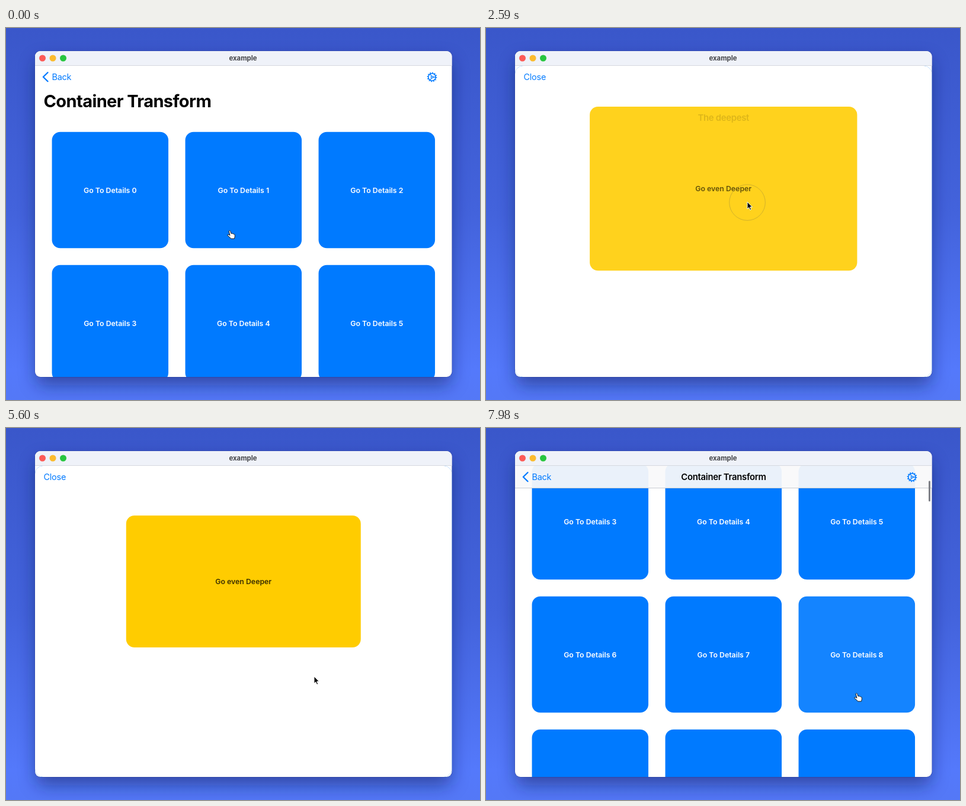
Recreate the animation shown at these times as an HTML page. Size 800x629 px, loop 8 s.

```html
<!DOCTYPE html>
<html lang="en">
<head>
<meta charset="utf-8">
<title>Container Transform</title>
<style>
html, body { margin: 0; width: 100%; height: 100%; overflow: hidden; background: #4362d8; }
svg { display: block; width: 100%; height: 100%; }
text { font-family: Inter, "Open Sans", sans-serif; font-optical-sizing: none; }
.mid { text-anchor: middle; }
.label { font-size: 12.3px; font-weight: 600; fill: #fff; }
.nav { font-size: 14.4px; letter-spacing: -.2px; fill: #007aff; }
.title { font-size: 14.9px; font-weight: 600; letter-spacing: -.3px; }
.large { font-size: 29px; font-weight: 700; letter-spacing: -.6px; }
.bar { font-size: 11.4px; font-weight: 700; fill: #444549; }
</style>
</head>
<body>
<svg id="stage" viewBox="0 0 800 629" preserveAspectRatio="none">
  <defs>
    <linearGradient id="sky" x1="0" y1="0" x2="0" y2="1">
      <stop offset="0" stop-color="#3a57ca"/>
      <stop offset=".5" stop-color="#4363dc"/>
      <stop offset=".92" stop-color="#5479fb"/>
      <stop offset="1" stop-color="#5478f6"/>
    </linearGradient>
    <filter id="soft" x="-20%" y="-20%" width="140%" height="140%"><feGaussianBlur stdDeviation="15"/></filter>
    <clipPath id="win"><rect x="49" y="39" width="703.5" height="551" rx="9"/></clipPath>
    <clipPath id="body"><rect x="49" y="64" width="704" height="526"/></clipPath>
  </defs>
  <rect width="800" height="629" fill="url(#sky)"/>
  <rect x="51" y="54" width="700" height="550" rx="12" fill="#101c58" opacity=".52" filter="url(#soft)"/>
  <rect x="48.5" y="38.5" width="704.5" height="552" rx="9.5" fill="#22317a" opacity=".45"/>
  <g clip-path="url(#win)">
    <rect x="49" y="39" width="704" height="551" fill="#fff"/>
    <g clip-path="url(#body)">
      <g id="list">
        <g id="scroll"><text class="large" x="63.5" y="134">Container Transform</text></g>
        <g id="navbar">
          <rect x="49" y="64" width="704" height="37" fill="#f9f9fa" fill-opacity=".94"/>
          <path d="M49 101.5H753" stroke="#c9ccd2"/>
          <text class="title mid" x="401" y="88">Container Transform</text>
        </g>
        <rect id="thumb" x="747" width="3" height="35" rx="1.5" fill="#808288"/>
        <path d="M70.5 75.2L62.8 82.7L70.5 90.2" fill="none" stroke="#007aff" stroke-width="2.3" stroke-linecap="round" stroke-linejoin="round"/>
        <text class="nav" x="77.5" y="88">Back</text>
        <g transform="translate(719 83)" fill="none" stroke="#007aff">
          <circle r="6.2" stroke-width="1.6"/>
          <circle r="7.6" stroke-width="1.5" stroke-dasharray="1.7 2.28"/>
          <circle r="1.7" stroke-width="1.2"/>
          <path d="M1.7 0H6M-.9 -1.5L-3 -5.2M-.9 1.5L-3 5.2" stroke-width="1.3"/>
        </g>
      </g>
      <g id="heroes"></g>
      <text id="close" class="nav" x="63.5" y="88">Close</text>
      <g id="ripples"></g>
    </g>
    <rect x="49" y="39" width="704" height="25" fill="#eff2f9"/>
    <path d="M49 63.5H753" stroke="#d6d9e0"/>
    <circle cx="61.5" cy="51" r="5.5" fill="#fc5b57"/>
    <circle cx="79" cy="51" r="5.5" fill="#fbbb2e"/>
    <circle cx="96.5" cy="51" r="5.5" fill="#28c63f"/>
    <text class="bar mid" x="400" y="55">example</text>
  </g>
  <path id="arrow" d="M0 0V12L2.8 9.5L4.7 13.8L6.7 12.9L4.8 8.7H8.4Z" fill="#000" stroke="#fff" stroke-width="1"/>
  <path id="hand" d="M-.9 .6C-.6 -.6 1.2 -.8 1.7 .5L3 4.6C4 4 5 4.3 5.4 5C6.3 4.6 7.1 5 7.4 5.7C8.5 5.5 9.1 6.2 9.2 7.2C9.4 9.2 9.3 11 8.2 13.2H2.6C1.3 11.3 -.7 9.6 -2.7 8.1C-3.8 6.9 -2.2 5.7 -.9 6.4L1 7.6Z" fill="#fff" stroke="#111" stroke-width="1"/>
</svg>
<script>
const LOOP = 8000, ROW = 225, SIDE = 196.5, RADIUS = 14;
const BLUE = '#007aff', YELLOW = '#ffcc00';
const PAGE = { x: 400.75, y: 327, w: 703.5, h: 526 };
const TILE = { x: 175.8, y: 274, w: SIDE, h: SIDE };
const DEEP = { x: 400.75, y: 259.5, w: 396, h: 223 };

const $ = id => document.getElementById(id);
const set = (node, attrs) => { for (const k in attrs) node.setAttribute(k, attrs[k]); };
const add = (parent, tag, attrs, text = '') => {
  const node = document.createElementNS('http://www.w3.org/2000/svg', tag);
  set(node, attrs);
  node.textContent = text;
  return parent.appendChild(node);
};
const clamp = v => Math.max(0, Math.min(1, v));
const mix = (a, b, k) => a + (b - a) * k;
const smooth = v => { v = clamp(v); return v * v * (3 - 2 * v); };
// what is left of a critically damped spring after ms
const spring = (rate, ms) => {
  const u = rate * Math.max(0, ms) / 1000;
  return (1 + u) * Math.exp(-u);
};

// pointer: time, x, y
const PATH = [
  [0, 377, 343], [200, 377, 343], [900, 218, 322], [1050, 220, 324], [1400, 222, 325],
  [2250, 441, 294], [2800, 441, 294], [3400, 169, 387], [3750, 169, 387], [4265, 421, 250],
  [4550, 451, 273], [5000, 458, 290], [5500, 520, 420], [5600, 520, 420], [6086, 582, 346],
  [6300, 645, 354], [6900, 640, 400], [7400, 625, 449], [8000, 625, 449]
];
function pointer(t) {
  const i = Math.max(1, PATH.findIndex(p => p[0] >= t));
  const [a, b] = [PATH[i - 1], PATH[i]];
  const k = smooth((t - a[0]) / (b[0] - a[0]));
  return { x: mix(a[1], b[1], k), y: mix(a[2], b[2], k) };
}

const scrollAt = t => 341 * (1 - (1 - clamp((t - 6850) / 950)) ** 3);
const inside = (p, r) => Math.abs(p.x - r.x) < r.w / 2 && Math.abs(p.y - r.y) < r.h / 2;
// fading hover from a few past moments
function hover(t, rectAt) {
  let n = 0;
  for (let i = 0; i < 6; i++) {
    const at = Math.max(0, t - i * 25);
    if (inside(pointer(at), rectAt(at))) n++;
  }
  return n / 6;
}

// a tile that grows to a page, is dragged, then springs home
const FLIGHTS = {
  tile: { rest: TILE, open: 1080, drag: 5600, release: 6086, pull: 13 },
  deep: { rest: DEEP, open: 2527, drag: 3750, release: 4265, pull: 9 }
};
function flight({ rest, open, drag, release, pull }, t) {
  const out = t >= release;
  let p = 0, x = rest.x, y = rest.y;
  if (t >= open && !out) {
    p = 1 - spring(12, t - open);
    x = mix(rest.x, PAGE.x, p);
    y = mix(rest.y, PAGE.y, p);
  }
  if (t >= drag) {
    const a = pointer(drag), b = pointer(Math.min(t, release));
    x = PAGE.x + b.x - a.x;
    y = PAGE.y + b.y - a.y;
  }
  if (out) {
    const left = spring(pull, t - release);
    p = spring(22, t - release);
    x = mix(rest.x, x, left);
    y = mix(rest.y, y, left);
  }
  return { p, x, y, out, w: mix(rest.w, PAGE.w, p), h: mix(rest.h, PAGE.h, p),
           moving: t >= open && t < release + 900 };
}
const box = (node, r, more) =>
  set(node, { x: r.x - r.w / 2, y: r.y - r.h / 2, width: r.w, height: r.h, ...more });
const place = (node, x, y, opacity) => set(node, { x, y, opacity });

const cards = [];
for (let i = 0; i < 12; i++) {
  const r = { x: TILE.x + i % 3 * ROW, y: TILE.y + Math.floor(i / 3) * ROW, w: SIDE, h: SIDE };
  const g = add($('scroll'), 'g', {});
  box(add(g, 'rect', { rx: RADIUS, fill: BLUE }), r);
  const glow = add(g, 'rect', { rx: RADIUS, fill: '#fff' });
  box(glow, r);
  add(g, 'text', { class: 'label mid', x: r.x, y: r.y + 4.5 }, 'Go To Details ' + i);
  cards.push({ g, glow, r });
}

function makeHero(fill) {
  const g = add($('heroes'), 'g', {});
  return { g, base: add(g, 'rect', { rx: RADIUS, fill }), veil: add(g, 'rect', { rx: RADIUS, fill: '#fff' }) };
}
const tile = makeHero(BLUE);
tile.label = add(tile.g, 'text', { class: 'label mid' }, 'Go To Details 0');
const ghost = add($('heroes'), 'rect', { rx: RADIUS, fill: '#f3f3f3' });
const deep = makeHero(YELLOW);
deep.label = add(deep.g, 'text', { class: 'label mid', style: 'fill:#161200' }, 'Go even Deeper');
deep.title = add(deep.g, 'text', { class: 'title mid' }, 'The deepest');
deep.end = add(deep.g, 'text', { class: 'mid', 'font-size': 12.3, 'letter-spacing': .25 }, 'This is the end.');

const ripples = [
  { start: 930, x: 218, y: 320, fill: .1, ring: '#0a5fd6', gap: 73 },
  { start: 2517, x: 441, y: 295, fill: 0, ring: '#b59c35', gap: 0 }
].map(r => ({
  ...r,
  disc: add($('ripples'), 'circle', { cx: r.x, cy: r.y, fill: '#fff' }),
  rim: add($('ripples'), 'circle', { cx: r.x + r.gap / 36, cy: r.y + r.gap / 24, fill: 'none', stroke: r.ring })
}));

function drawList(t, hero) {
  const s = scrollAt(t), bar = smooth((s - 20) / 40);
  set($('list'), { opacity: clamp((1 - hero.p) * 1.05) });
  set($('scroll'), { transform: `translate(0 ${-s})` });
  set($('navbar'), { opacity: bar });
  set($('thumb'), { y: 67 + s * .065, opacity: bar });
  const live = t > 400 && t < 1400 || t > 6150;
  cards.forEach(({ g, glow, r }, i) => {
    const over = live ? hover(t, at => ({ ...r, y: r.y - scrollAt(at) })) : 0;
    const press = i === 0 ? smooth((t - 930) / 100) * (t < 1400) : 0;
    set(glow, { opacity: over * (.08 + .04 * press) });
    set(g, { visibility: i === 0 && hero.moving ? 'hidden' : 'visible' });
  });
}

function drawTile(hero) {
  const base = hero.out ? .055 : .12;
  set(tile.g, { visibility: hero.moving ? 'visible' : 'hidden' });
  box(tile.base, hero);
  box(tile.veil, hero, { opacity: mix(base, 1, hero.p) });
  place(tile.label, hero.x, hero.y + 4.5, (1 - hero.p) ** 2);
}

function drawDeep(t, hero, page) {
  const shown = page.moving ? page.p ** 3 : 0;
  const r = { ...hero };
  if (!hero.moving) {
    r.x += page.x - PAGE.x;
    r.y += page.y - PAGE.y;
  }
  const rest = .08 * hover(t, () => DEEP);
  const lit = !hero.moving ? rest
    : hero.out ? mix(.18, rest, smooth((t - 4700) / 400)) * (1 - hero.p)
    : .14 * (1 - hero.p);
  set(deep.g, { opacity: shown });
  box(deep.base, r);
  box(deep.veil, r, { opacity: lit });
  place(deep.label, r.x, r.y + 4.5, .84 * (1 - hero.p) ** 1.2);
  place(deep.title, r.x, r.y - r.h / 2 + 24, hero.out ? hero.p : hero.p ** 1.2);
  place(deep.end, r.x, r.y + 4.5, hero.p ** 3);
  box(ghost, { x: r.x + 4, y: r.y + 8, w: r.w - 24, h: r.h + 14 },
    { opacity: hero.out ? shown * (1 - smooth((t - 4580) / 200)) : 0 });
}

function drawRipples(t) {
  for (const { start, fill, gap, disc, rim } of ripples) {
    const age = t - start, on = age > 0 ? 1 - smooth((age - 120) / 100) : 0;
    set(disc, { r: Math.max(0, age * .41), opacity: fill * on });
    set(rim, { r: Math.max(0, (age - gap) * .41), opacity: age > gap ? .6 * on : 0 });
  }
}

function drawPointer(t) {
  const { x, y } = pointer(t);
  const hand = t < 1150 || t > 2150 && t < 2530 || t > 6200;
  for (const [id, on] of [['hand', hand], ['arrow', !hand]])
    set($(id), { transform: `translate(${x} ${y})`, visibility: on ? 'visible' : 'hidden' });
}

function draw(t) {
  const page = flight(FLIGHTS.tile, t), inner = flight(FLIGHTS.deep, t);
  drawList(t, page);
  drawTile(page);
  drawDeep(t, inner, page);
  set($('close'), { opacity: page.moving ? page.p ** 2 * mix(1, .85, inner.p) : 0 });
  drawRipples(t);
  drawPointer(t);
}

const began = performance.now();
function tick() {
  draw((performance.now() - began) % LOOP);
  requestAnimationFrame(tick);
}
tick();
</script>
</body>
</html>
```
